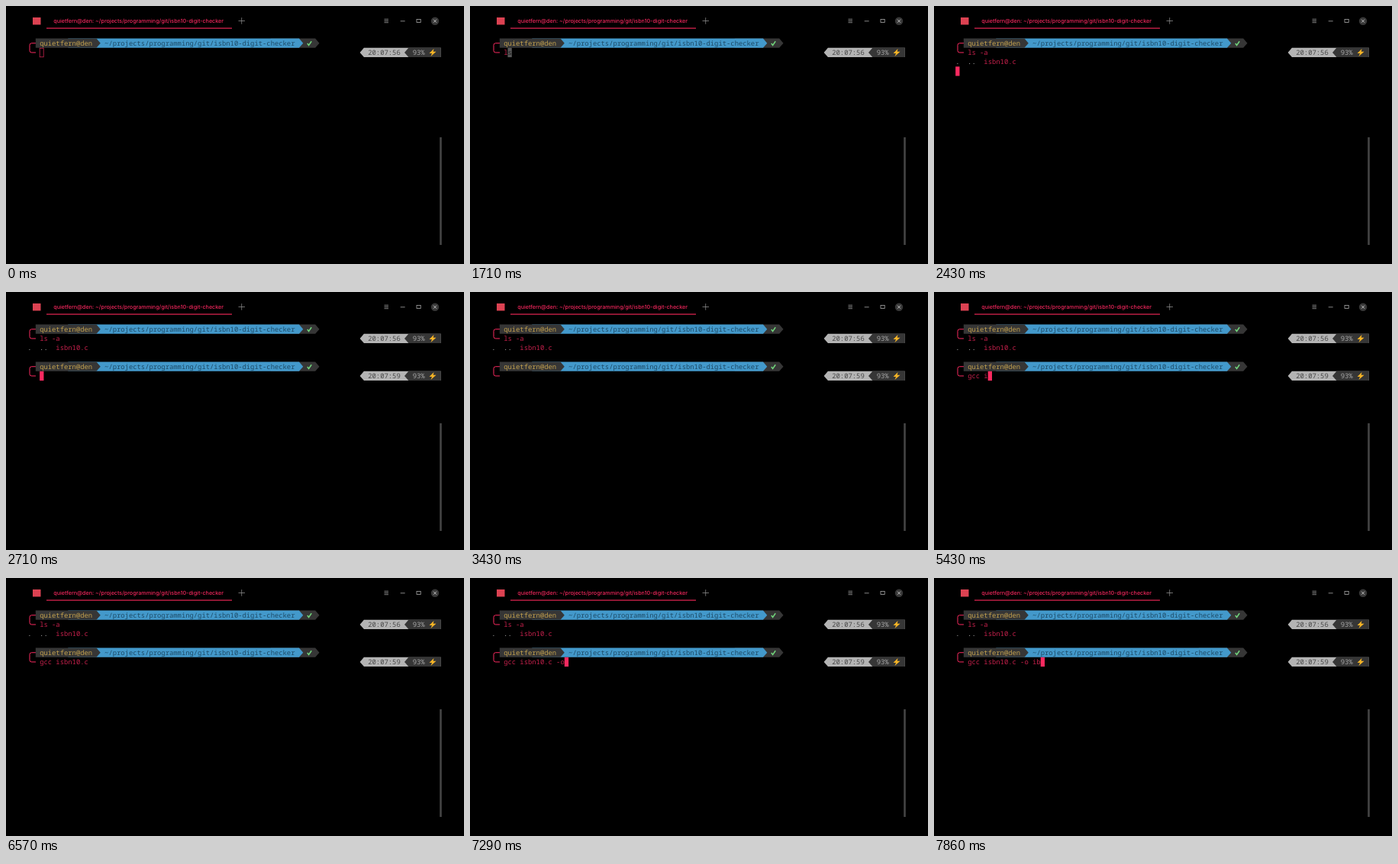
Recreate the animation shown at these times as an HTML page. Size 600x338 px, loop 8000 ms.

```html
<!DOCTYPE html>
<html lang="en">
<head>
<meta charset="utf-8">
<title>Terminal session</title>
<style>
  html, body { margin: 0; width: 100%; height: 100%; overflow: hidden; background: #000; }
  svg { display: block; width: 100vw; height: 100vh; }
  text { white-space: pre; text-rendering: geometricPrecision; }
  .mono { font: 8.85px "Noto Sans Mono", "DejaVu Sans Mono", monospace; }
  .title { font: 500 7.15px Inter, Roboto, sans-serif; }
</style>
</head>
<body>
<svg viewBox="0 0 600 338">
  <rect width="600" height="338" fill="#000"/>
  <rect x="35" y="15" width="10.5" height="9.5" fill="#dc4252"/>
  <text class="title" x="285" y="21.8" text-anchor="end" fill="#f0265c">quietfern@den: ~/projects/programming/git/isbn10-digit-checker</text>
  <path d="M53 29.2H296" stroke="#dc2450" stroke-width="1.2"/>
  <g fill="none" stroke="#a8a8a8" stroke-width=".8">
    <path d="M304.5 19.5h8.5M308.7 15.2v8.5" stroke="#8a8a8a"/>
    <path d="M495.5 17.3h5.5M495.5 19.5h5.5M495.5 21.7h5.5M516.7 19.8h6"/>
    <rect x="538" y="17.5" width="5.2" height="4"/>
    <circle cx="562" cy="19.7" r="5.2" fill="#383838" stroke="none"/>
    <path d="M560 17.7l4 4m0-4l-4 4" stroke="#ddd"/>
  </g>
  <rect x="568.2" y="172" width="2.6" height="141" fill="#444"/>
  <g id="screen"></g>
</svg>
<script>
const LOOP = 8000, BLINK = 570;
const LEFT = 28.2, PITCH = 5.31, TOP = 42.6, LINE = 12.25;
const PINK = '#fb2a60', TEXT = '#c4204b', DARK = '#363636', BLUE = '#4399cb', LIGHT = '#b4b4b4';
const FOCUS = 710, ENTER = 2430, PROMPT = 2710;

// [time, typed command]
const FIRST = [[FOCUS, ''], [1710, 'l'], [1860, 'ls'], [2000, 'ls '], [2140, 'ls -'], [2290, 'ls -a']];
const SECOND = [[ENTER, ''], [4860, 'g'], [5000, 'gc'], [5140, 'gcc'], [5290, 'gcc '], [5430, 'gcc i'],
  [5570, 'gcc is'], [6000, 'gcc isbn10.c '], [6860, 'gcc isbn10.c -'], [7290, 'gcc isbn10.c -o'],
  [7430, 'gcc isbn10.c -o '], [7710, 'gcc isbn10.c -o i'], [7860, 'gcc isbn10.c -o ib']];

const colX = col => LEFT + col * PITCH;
const rowY = row => TOP + row * LINE;
const text = (col, row, str, fill) =>
  `<text class="mono" x="${colX(col)}" y="${rowY(row) + 9.3}" fill="${fill}">${str}</text>`;
const poly = (points, fill) => `<polygon points="${points.join(' ')}" fill="${fill}"/>`;

// Powerline segments: a bar with a pointed end on one side.
function rightArrow(from, to, row, fill) {
  const y = rowY(row), x = colX(to);
  return poly([colX(from), y, x, y, x + PITCH, y + LINE / 2, x, y + LINE, colX(from), y + LINE], fill);
}
function leftArrow(from, to, row, fill) {
  const y = rowY(row), x = colX(from);
  return poly([x, y + LINE / 2, x + PITCH, y, colX(to), y, colX(to), y + LINE, x + PITCH, y + LINE], fill);
}

function prompt(row, clock) {
  const y = rowY(row) + LINE / 2, low = y + LINE;
  return `<path d="M39 ${y}H33.5Q31 ${y} 31 ${y + 2.5}V${low - 2.5}Q31 ${low} 33.5 ${low}H39" fill="none" stroke="${PINK}"/>`
    + rightArrow(60, 71, row, DARK)
    + rightArrow(10, 67, row, BLUE)
    + rightArrow(2, 17, row, DARK)
    + text(3, row, 'quietfern@den', '#c2a04e')
    + text(19, row, '~/projects/programming/git/isbn10-digit-checker', '#1d4a66')
    + `<path d="M394.8 ${y + .3}l1.8 2.4 3.6-5.2" fill="none" stroke="#72d67c" stroke-width="1.5"/>`
    + leftArrow(82, 102, row + 1, LIGHT)
    + leftArrow(93, 102, row + 1, DARK)
    + text(84, row + 1, clock, '#484848')
    + text(95, row + 1, '93%', '#a6a6a6')
    + poly([560.5, low - 5, 554.5, low + 1, 558, low + 1, 556.5, low + 5, 563.5, low - 1.3, 559.7, low - 1.3], '#f6b426');
}

const cursor = (col, row, attrs) =>
  `<rect x="${colX(col)}" y="${rowY(row)}" width="${PITCH}" height="${LINE}" ${attrs}/>`;
const latest = (keys, t) => keys.filter(key => key[0] <= t).pop() || [0, ''];

function draw(t) {
  const entered = t >= ENTER, prompted = t >= PROMPT;
  const [since, typed] = latest(entered ? SECOND : FIRST, t);
  const row = !entered ? 1 : prompted ? 5 : 3;
  const col = entered && !prompted ? 0 : 3 + typed.length;
  const lit = Math.floor((t - since) / BLINK) % 2 === 0;

  let out = prompt(0, '20:07:56') + text(3, 1, entered ? 'ls -a' : typed, TEXT);
  if (entered) out += text(0, 2, '.  ..', '#b0b0b0') + text(7, 2, 'isbn10.c', TEXT);
  if (prompted) out += prompt(4, '20:07:59') + text(3, 5, typed, TEXT);

  if (t < FOCUS) {
    out += `<rect x="44.2" y="55.3" width="5" height="11.5" fill="none" stroke="#c8234d" stroke-width=".8"/>`;
  } else if (typed === 'l') {
    out += cursor(col, row, 'fill="#585858"') + text(col, row, 's', '#1c1c1c');
  } else if (lit) {
    out += cursor(col, row, `fill="${PINK}"`);
  }
  return out;
}

const screen = document.getElementById('screen');
const start = performance.now();
let shown = '';
function tick() {
  const next = draw((performance.now() - start) % LOOP);
  if (next !== shown) screen.innerHTML = shown = next;
  requestAnimationFrame(tick);
}
tick();
</script>
</body>
</html>
```
